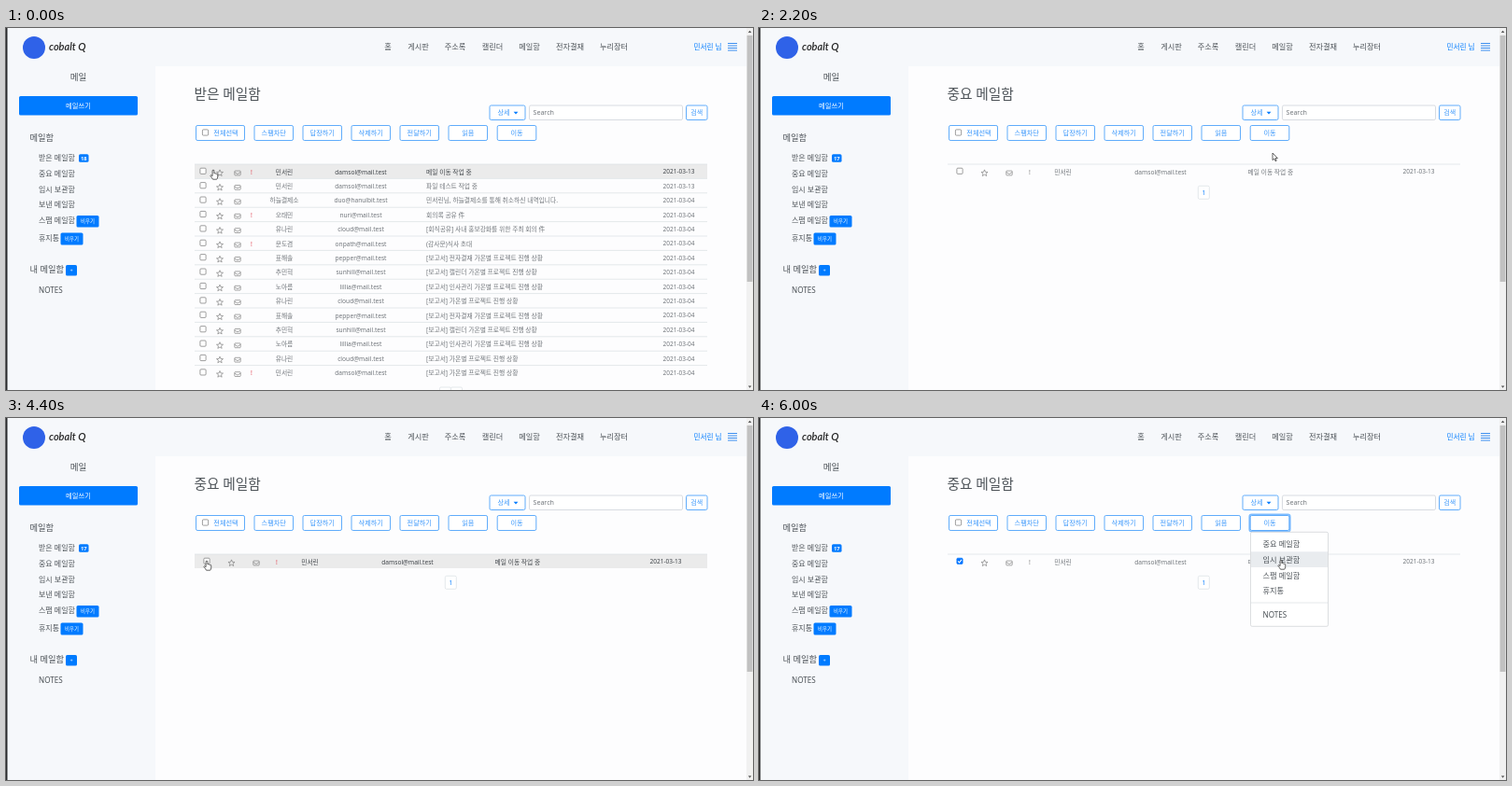
Write an HTML page that moves like this. It is 800 by 388 pixels and loops after 8 s.

```html
<!DOCTYPE html>
<html lang="ko">
<head>
<meta charset="utf-8">
<title>메일함</title>
<style>
  html, body { margin: 0; width: 100%; height: 100%; overflow: hidden; background: #fdfdfe; }
  svg { display: block; width: 800px; height: 388px; }
  text { font-family: "Noto Sans", "Noto Sans CJK KR", sans-serif; fill: #4d5358; }
  .mid { text-anchor: middle; }
  .light { font-weight: 300; }
  .strong { font-weight: 500; }
  .bold { font-weight: 700; }
  .cell { fill: #71767b; }
  .blue { fill: #007bff; }
  .soft { fill: #3a97fb; }
  .white { fill: #fff; }
  .bang { fill: #e0404f; }
  .line { stroke: #dee2e6; stroke-width: .8; }
  .btn { fill: #fff; stroke: #4fa3fb; stroke-width: .9; }
  .icon { fill: none; stroke: #777; stroke-width: .65; stroke-linejoin: round; }
  .box { fill: #fff; stroke: #767676; stroke-width: .7; }
  .tick { fill: none; stroke: #fff; stroke-width: 1.1; visibility: hidden; }
  .checked .first .box { fill: #0075ff; stroke: #0075ff; }
  .checked .first .tick { visibility: visible; }
  .hover-bg { fill: none; }
  .row-hover .first .hover-bg { fill: #ebebeb; }
  .row-hover .first .cell { fill: #40454a; }
  .important .bang { fill: #777; }
  .row-hover .important .bang { fill: #e0404f; }
  .menu, .ring, .important, .moved .inbox { display: none; }
  .moved .important, .open .menu, .open .ring { display: inline; }
  .move-hover .move .btn { fill: #007bff; }
  .move-hover .move text { fill: #fff; }
  .arrow .hand, .hand-on .pointer { display: none; }
</style>
</head>
<body>
<svg id="stage" viewBox="0 0 800 388"></svg>
<script>
const stage = document.getElementById('stage');

const text = (x, y, size, str, cls = '') =>
  `<text x="${x}" y="${y}" dy=".38em" font-size="${size}" class="${cls}">${str}</text>`;
const rect = (x, y, w, h, attrs = '') =>
  `<rect x="${x}" y="${y}" width="${w}" height="${h}" ${attrs}/>`;
const line = (x1, y1, x2, y2, attrs = 'class="line"') =>
  `<path d="M${x1} ${y1}L${x2} ${y2}" ${attrs}/>`;
const group = (cls, body) => `<g class="${cls}">${body}</g>`;
const button = (x, y, w, h, label, size, cx = x + w / 2) =>
  rect(x, y, w, h, 'rx="1.6" class="btn"') + text(cx, y + h / 2, size, label, 'mid soft');
const solid = (x, y, w, h, label, size, cls = '') =>
  rect(x, y, w, h, 'rx="1.6" fill="#007bff"') + text(x + w / 2, y + h / 2, size, label, 'mid white ' + cls);

const checkbox = (x, y) => rect(x - 3.1, y - 3.1, 6.2, 6.2, 'rx="1" class="box"') +
  `<path class="tick" d="M${x - 1.9} ${y}l1.4 1.5 2.5-3"/>`;

function star(cx, cy) {
  const points = Array.from({ length: 10 }, (_, i) => {
    const r = i % 2 ? 1.6 : 3.7, a = i * Math.PI / 5;
    return `${(cx + r * Math.sin(a)).toFixed(2)},${(cy - r * Math.cos(a)).toFixed(2)}`;
  });
  return `<polygon class="icon" points="${points.join(' ')}"/>`;
}

const envelope = (x, y) => rect(x - 3.2, y - 2.4, 6.4, 4.8, 'rx=".7" class="icon"') +
  `<path class="icon" d="M${x - 3.2} ${y - 1}l3.2 2 3.2-2"/>`;

const inboxCols = { check: 211, star: 229, mail: 248, bang: 263, name: 298, addr: 380, title: 450, date: 720.5 };
const importantCols = { check: 215, star: 241.5, mail: 268, bang: 290, name: 325.5, addr: 430, title: 523.5, date: 706.5 };

function row(i, col, [person, title, date, urgent]) {
  const top = 146 + 15.4 * i, y = top + 8;
  const [name, addr] = person;
  return group(i ? '' : 'first',
    rect(202, top, 549, 15, 'class="hover-bg"') + line(202, top, 751, top) +
    checkbox(col.check, y - .7) + star(col.star, y + 1.6) + envelope(col.mail, y + 1.5) +
    (urgent ? text(col.bang, y, 6.7, '!', 'mid bang') : '') +
    text(col.name, y, 6.75, name, 'mid cell') +
    text(col.addr, y, 6.6, addr, 'mid cell') +
    text(col.title, y, 6.75, title, 'cell') +
    text(col.date, y, 6.5, '2021-03-' + date, 'mid cell'));
}

const me = ['민서린', 'damsol@mail.test'];
const pay = ['하늘결제소', 'duo@hanulbit.test'];
const oh = ['오태민', 'nuri@mail.test'];
const yu = ['유나린', 'cloud@mail.test'];
const moon = ['문도겸', 'onpath@mail.test'];
const pyo = ['표해솔', 'pepper@mail.test'];
const chu = ['추민혁', 'sunhill@mail.test'];
const noh = ['노아름', 'lillia@mail.test'];
const report = (part = '') => `[보고서] ${part}가온별 프로젝트 진행 상황`;

const mails = [
  [me, '메일 이동 작업 중', '13', true],
  [me, '파일 테스트 작업 중', '13'],
  [pay, '민서린님, 하늘결제소를 통해 취소하신 내역입니다.', '04'],
  [oh, '회의록 공유 件', '04', true],
  [yu, '[회식공유] 사내 홍보강화를 위한 주최 회의 件', '04'],
  [moon, '(감사문)식사 초대', '04', true],
  [pyo, report('전자결재 '), '04'],
  [chu, report('캘린더 '), '04'],
  [noh, report('인사관리 '), '04'],
  [yu, report(), '04'],
  [pyo, report('전자결재 '), '04'],
  [chu, report('캘린더 '), '04'],
  [noh, report('인사관리 '), '04'],
  [yu, report(), '04'],
  [me, report(), '04', true]
];

function header() {
  const nav = [['홈', 409], ['게시판', 441.5], ['주소록', 481], ['캘린더', 521],
    ['메일함', 560.5], ['전자결재', 604], ['누리장터', 651]];
  return rect(0, 0, 800, 41, 'fill="#f6f8fb"') +
    '<circle cx="30" cy="21" r="12" fill="#2f62e8"/>' +
    '<text x="46" y="24.3" font-size="11" font-weight="600" font-style="italic" ' +
      'style="font-family:Lato,sans-serif;fill:#222">cobalt Q</text>' +
    nav.map(([label, x]) => text(x, 20, 8.2, label, 'mid strong')).join('') +
    text(751.5, 20, 7.6, '민서린 님', 'mid blue strong') +
    [16.5, 19, 21.5, 24].map(y => line(773, y, 783, y, 'stroke="#3d8ff0" stroke-width="1"')).join('');
}

function sidebar() {
  const items = [['받은 메일함', 139], ['중요 메일함', 155.7], ['임시 보관함', 172.5],
    ['보낸 메일함', 189.3], ['스팸 메일함', 206.3], ['휴지통', 225.3]];
  return rect(0, 41, 160, 347, 'fill="#f6f8fb"') +
    text(77.5, 52, 9.6, '메일', 'mid') +
    solid(14, 73, 127, 20.5, '메일쓰기', 7.3) +
    text(25.5, 117.2, 9.3, '메일함') + text(25.5, 258.5, 9.3, '내 메일함') +
    items.map(([label, y]) => text(35, y, 8, label)).join('') +
    text(35, 281, 8.1, 'NOTES') +
    group('inbox', solid(78, 135.2, 10.5, 8.6, '18', 5.8, 'bold')) +
    group('important', solid(78, 135.2, 10.5, 8.6, '17', 5.8, 'bold')) +
    solid(75.5, 201, 24, 12.6, '비우기', 5.4, 'strong') +
    solid(58.5, 219.5, 24, 13, '비우기', 5.4, 'strong') +
    solid(64, 254, 12, 11.5, '+', 5.6, 'strong');
}

function toolbar() {
  const labels = ['스팸차단', '답장하기', '삭제하기', '전달하기', '읽음'];
  return button(518, 83, 38, 15.5, '상세', 7.1, 533) +
    '<path d="M543.6 89.7h4.8l-2.4 2.9z" class="blue"/>' +
    rect(560.5, 83, 164, 15.5, 'rx="1.6" fill="#fff" stroke="#ced4da" stroke-width=".8"') +
    text(564.5, 90.8, 7.1, 'Search', 'cell') +
    button(728.5, 83, 22.5, 15.5, '검색', 7) +
    button(203.5, 104.5, 52, 16, '전체선택', 7.2, 235.5) + checkbox(213.5, 112) +
    labels.map((label, i) => button(266 + 52 * i, 104.5, 41.5, 16, label, 7.2)).join('') +
    rect(525.2, 103.4, 43.6, 18.2, 'rx="2.4" class="ring" fill="none" stroke="#7fbdff" stroke-width="1.6"') +
    group('move', button(526.2, 104.5, 41.6, 16, '이동', 7.2));
}

function menu() {
  const labels = ['중요 메일함', '임시 보관함', '스팸 메일함', '휴지통'];
  return group('menu',
    rect(526.5, 122.3, 83, 101, 'rx="1.6" fill="#fff" stroke="#d4d6d8" stroke-width=".8"') +
    rect(527, 0, 82, 16.7, 'id="pick" fill="#e9ecef"') +
    labels.map((label, i) => text(539.5, 135 + 16.7 * i, 8.2, label)).join('') +
    line(527, 198, 609, 198) + text(539.5, 211, 8.1, 'NOTES'));
}

function scrollbar() {
  return rect(793, 0, 7, 388, 'fill="#f1f1f1"') + rect(793.6, 8, 5.8, 264, 'fill="#c1c1c1"') +
    '<path d="M794.8 5h3.6l-1.8-2.2zM794.8 383.5h3.6l-1.8 2.2z" fill="#555"/>';
}

const pageBox = (x, y) => rect(x, y, 12, 14, 'rx="1.4" fill="#fff" stroke="#dee2e6" stroke-width=".8"');

const cursor = `<g id="cursor" fill="#fff" stroke="#222" stroke-width=".7" stroke-linejoin="round">
  <path class="pointer" d="M0 0v7.6l1.8-1.6 1.2 2.7 1.2-.5-1.2-2.6h2.4z"/>
  <path class="hand" d="M-.9 .6q.9-1.1 1.8 0v3.2q.9-.5 1.4.2 .8-.4 1.3.4 1-.3 1.1.8v2.6q-.2 1.4-1 2.4h-4.2q-.9-1.8-2.7-3.8 .4-1.4 2.3.2z"/>
</g>`;

stage.innerHTML = rect(0, 0, 800, 388, 'fill="#fdfdfe"') + header() + sidebar() +
  rect(0, 0, 1.5, 388, 'fill="#2a2a2c"') +
  toolbar() +
  group('inbox', text(201.5, 70.5, 14.7, '받은 메일함', 'light') +
    mails.map((mail, i) => row(i, inboxCols, mail)).join('') +
    pageBox(464.5, 385) + pageBox(476.5, 385)) +
  group('important', text(201.5, 70.5, 14.7, '중요 메일함', 'light') +
    row(0, importantCols, mails[0]) +
    pageBox(470.3, 169.3) + text(476.3, 176.4, 6.4, '1', 'mid blue')) +
  menu() + scrollbar() + cursor;

// time, x, y, then flags: h hand, c checked, o menu open, m mail moved
const steps = [
  [0, 222, 152, 'h'], [200, 211, 153, 'h'], [400, 211, 153, 'hc'],
  [600, 290, 156, 'hc'], [800, 376, 156, 'hc'], [1000, 465, 139, 'hc'],
  [1200, 540, 113, 'hc'], [1400, 540, 113, 'hco'], [1600, 545, 122, 'hco'],
  [1800, 553, 133, 'hco'], [2200, 550, 134, 'm'], [2400, 546, 134, 'm'],
  [2600, 546, 136, 'm'], [2800, 545, 138, 'm'], [3000, 544, 139, 'm'],
  [3200, 543, 143, 'm'], [3400, 543, 157, 'hm'], [3600, 544, 166, 'm'],
  [4000, 440, 157, 'hm'], [4200, 300, 154, 'hm'], [4400, 215, 153, 'hm'],
  [4600, 215, 153, 'hmc'], [4800, 360, 149, 'hmc'], [5000, 485, 128, 'hmc'],
  [5200, 515, 122, 'hmc'], [5400, 540, 113, 'hmc'], [5600, 540, 113, 'hmco'],
  [5800, 550, 131, 'hmco'], [6000, 559, 152, 'hmco']
];
const pick = document.getElementById('pick');
const pointer = document.getElementById('cursor');
let shown;

function draw() {
  const time = performance.now() % 8000;
  const step = steps.findLast(s => s[0] <= time);
  if (step !== shown) show(shown = step);
  requestAnimationFrame(draw);
}

function show([, x, y, flags]) {
  const has = flag => flags.includes(flag);
  const set = (cls, on) => stage.classList.toggle(cls, on);
  const item = has('o') ? Math.floor((y - 126.6) / 16.7) : -1;
  set('checked', has('c'));
  set('open', has('o'));
  set('moved', has('m'));
  set('hand-on', has('h'));
  set('arrow', !has('h'));
  set('row-hover', !has('o') && y > 146 && y < 161);
  set('move-hover', x > 526 && x < 568 && y > 104 && y < 121);
  pick.setAttribute('y', 126.6 + 16.7 * Math.max(item, 0));
  pick.setAttribute('visibility', item < 0 ? 'hidden' : 'inherit');
  pointer.setAttribute('transform', `translate(${x} ${y})`);
}

draw();
</script>
</body>
</html>
```
